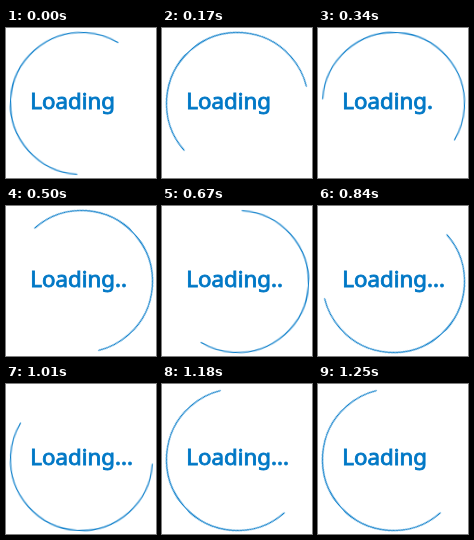
These frames come from a looping animation (150x150 px, 1350 ms). An HTML page:

```html
<!DOCTYPE html>
<html lang="en">
<head>
<meta charset="utf-8">
<title>Loading</title>
<style>
  html, body {
    margin: 0;
    width: 100%;
    height: 100%;
    overflow: hidden;
    background: #fff;
  }
  svg { display: block; width: 150px; height: 150px; }

  .ring {
    fill: none;
    stroke: #1080cb;
    stroke-width: 1.2;
    stroke-dasharray: 207.7 360;
    transform-origin: 75.5px 75.5px;
    animation: turn 1350ms step-end infinite;
  }
  /* A thin outline gives a weight between regular and bold */
  text {
    font: 400 22.3px "Noto Sans", "Open Sans", sans-serif;
    fill: #0078c6;
    stroke: #0078c6;
    stroke-width: .9;
  }
  .dot { animation: 1350ms step-end infinite; }
  .one { animation-name: one; }
  .two { animation-name: two; }
  .three { animation-name: three; }

  /* Eight hard steps of 45 degrees */
  @keyframes turn {
    0% { transform: rotate(93.5deg); }
    12.59% { transform: rotate(138.5deg); }
    25.18% { transform: rotate(183.5deg); }
    37.03% { transform: rotate(228.5deg); }
    49.62% { transform: rotate(273.5deg); }
    62.22% { transform: rotate(318.5deg); }
    74.81% { transform: rotate(363.5deg); }
    87.4% { transform: rotate(408.5deg); }
    100% { transform: rotate(453.5deg); }
  }

  /* The dots come in one by one and leave together */
  @keyframes one {
    0%, 92.59%, 100% { visibility: hidden; }
    17.77% { visibility: visible; }
  }
  @keyframes two {
    0%, 92.59%, 100% { visibility: hidden; }
    34.81% { visibility: visible; }
  }
  @keyframes three {
    0%, 92.59%, 100% { visibility: hidden; }
    54.81% { visibility: visible; }
  }
</style>
</head>
<body>
<svg viewBox="0 0 150 150">
  <circle class="ring" cx="75.5" cy="75.5" r="71" pathLength="360"/>
  <text x="24.3" y="81">Loading<tspan class="dot one">.</tspan><tspan class="dot two">.</tspan><tspan class="dot three">.</tspan></text>
</svg>
</body>
</html>
```
